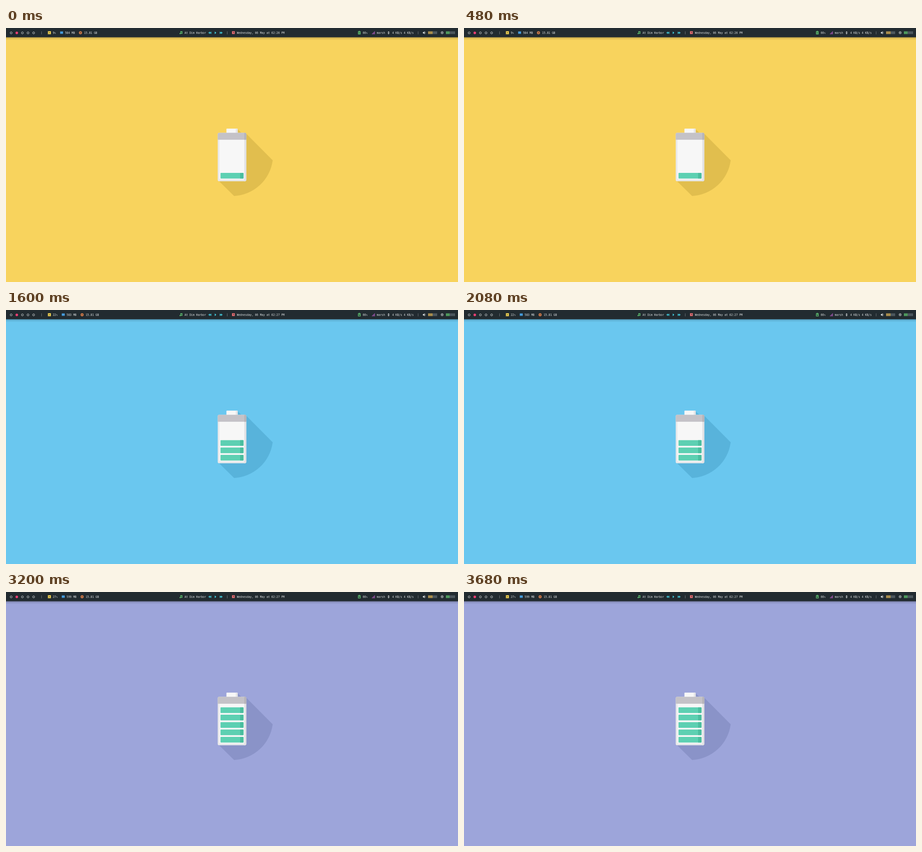
An HTML page with a canvas that plays this animation: 998 by 561 pixels, repeating every 4000 ms.

```html
<!DOCTYPE html>
<html lang="en">
<head>
<meta charset="utf-8">
<title>Battery desktop</title>
<style>
html, body { margin: 0; width: 100%; height: 100%; overflow: hidden; }
canvas { display: block; }
</style>
</head>
<body>
<canvas id="stage" width="998" height="561"></canvas>
<script>
const ctx = document.getElementById('stage').getContext('2d', { alpha: false });
const STEP = 800;
const TEXT_SCALE = 998 / 1920;
const CHAR = 7 * TEXT_SCALE;
const BAR = '#222b30', INK = '#dde1e2', CYAN = '#43cfe0';

const scenes = [
  { back: '#f8d35d', shade: '#e1be4e', cpu: 9, ram: 584, minute: 26 },
  { back: '#8aea93', shade: '#73cd7d', cpu: 6, ram: 584, minute: 26 },
  { back: '#6ac7ef', shade: '#58b3db', cpu: 22, ram: 583, minute: 27 },
  { back: '#ff8a88', shade: '#f97775', cpu: 1, ram: 583, minute: 27 },
  { back: '#9da5da', shade: '#8a93c8', cpu: 27, ram: 599, minute: 27 }
];

function rect(x, y, w, h, color) {
  ctx.fillStyle = color;
  ctx.fillRect(x, y, w, h);
}

function rounded(x, y, w, h, radius, color) {
  ctx.fillStyle = color;
  ctx.beginPath();
  ctx.roundRect(x, y, w, h, radius);
  ctx.fill();
}

function shape(color, ...points) {
  ctx.fillStyle = color;
  ctx.beginPath();
  points.forEach(([x, y]) => ctx.lineTo(x, y));
  ctx.fill();
}

function disc(x, y, r, color) {
  ctx.fillStyle = color;
  ctx.beginPath();
  ctx.arc(x, y, r, 0, 2 * Math.PI);
  ctx.fill();
}

function ring(x, y, r, color, width) {
  ctx.strokeStyle = color;
  ctx.lineWidth = width;
  ctx.beginPath();
  ctx.arc(x, y, r, 0, 2 * Math.PI);
  ctx.stroke();
}

function text(str, x, size = 11.63) {
  ctx.save();
  ctx.translate(x, 12.9);
  ctx.scale(TEXT_SCALE, TEXT_SCALE);
  ctx.font = `${size}px "DejaVu Sans Mono", monospace`;
  ctx.fillStyle = INK;
  ctx.fillText(str, 0, 0);
  ctx.restore();
}

function percent(value, x) {
  const digits = String(value);
  text(digits, x);
  text('%', x + digits.length * CHAR + 0.2, 9.5);
}

function separator(x) {
  rect(x, 7.5, 0.8, 6.5, '#7d8589');
}

function cpuIcon(x) {
  const color = '#f3d351';
  rect(x + 1, 8, 4.6, 4.8, color);
  for (const d of [0, 2.7, 5.4]) {
    rect(x + d, 7.1, 1.1, 6.6, color);
    rect(x, 7.1 + d, 6.5, 1.1, color);
  }
  rect(x + 2.5, 9.5, 1.6, 1.7, BAR);
}

function ramIcon(x) {
  const color = '#479edf';
  rect(x, 8.2, 6.4, 4, color);
  for (let i = 0; i < 4; i++) rect(x + 0.3 + i * 1.65, 7.2, 0.9, 6.1, color);
}

function diskIcon(x) {
  ring(x, 10.4, 2.45, '#ee874d', 1.6);
  disc(x, 10.4, 0.9, '#ee874d');
}

function musicIcon() {
  const color = '#6bdc7d';
  rect(385, 7.5, 0.9, 5, color);
  rect(388.4, 7.5, 0.9, 4.5, color);
  rect(385, 7.5, 4.3, 1.4, color);
  disc(384.6, 12.3, 1.2, color);
  disc(388, 11.8, 1.2, color);
}

function arrow(x, direction, width = 3.1) {
  shape(CYAN, [x, 7.7], [x + direction * width, 10.6], [x, 13.5]);
}

function clockIcon() {
  rect(499, 7.1, 6.2, 6.2, '#ec6f73');
  rect(501.6, 8, 0.8, 3, BAR);
  rect(501.6, 10.2, 2.4, 0.8, BAR);
}

function powerIcon(charging) {
  const color = '#6bdc7d';
  rect(778.8, 6.6, 2.6, 1.2, color);
  rect(777.3, 7.5, 5.6, 6.5, color);
  rect(778.4, 8.6, 3.4, 4.3, BAR);
  if (charging) {
    shape(color, [780.4, 8.8], [778.7, 11], [781.6, 11]);
  } else {
    rect(779, 9.2, 2.2, 1.2, color);
    rect(779, 11.2, 2.2, 1.2, color);
  }
}

function speakerIcon() {
  shape(INK, [920.4, 9.2], [922, 9.2], [924.2, 7.2], [924.2, 13.8], [922, 11.8], [920.4, 11.8]);
  rect(925.3, 8, 0.8, 0.9, INK);
  rect(925.3, 10.1, 1.5, 0.9, INK);
  rect(925.3, 12.2, 0.8, 0.9, INK);
}

function sunIcon(x, y) {
  ring(x, y, 1.6, INK, 1);
  for (let i = 0; i < 8; i++) {
    const a = i * Math.PI / 4;
    disc(x + 2.8 * Math.cos(a), y + 2.8 * Math.sin(a), 0.55, INK);
  }
}

function meter(x, filled, color) {
  for (let i = 0; i < 10; i++) rect(x + i * 2.02, 7.4, 1.3, 6, i < filled ? color : '#657077');
}

function panel(scene, charging) {
  const glow = ctx.createLinearGradient(0, 20, 0, 27);
  glow.addColorStop(0, 'rgba(0,0,0,.3)');
  glow.addColorStop(0.4, 'rgba(0,0,0,.1)');
  glow.addColorStop(1, 'rgba(0,0,0,0)');
  rect(0, 20, 998, 7, glow);
  rect(0, 0, 998, 20.4, BAR);

  for (let i = 0; i < 5; i++) {
    const x = 11.4 + i * 12.4;
    if (i === 1) disc(x, 10.8, 2.8, '#f53f74');
    else ring(x, 10.8, 2.2, INK, 0.9);
  }
  [78.2, 488.1, 909.6].forEach(separator);

  const shift = scene.cpu > 9 ? CHAR : 0;
  cpuIcon(92.6);
  percent(scene.cpu, 103.2);
  ramIcon(119.6 + shift);
  text(`${scene.ram} MB`, 130.2 + shift);
  diskIcon(164.4 + shift);
  text('15.81 GB', 172.3 + shift);

  musicIcon();
  text('At Dim Harbor', 394.3);
  arrow(450.1, -1);
  arrow(453.2, -1);
  arrow(460.9, 1, 3.4);
  arrow(472, 1);
  arrow(475, 1);
  clockIcon();
  text(`Wednesday, 06 May at 02:${scene.minute} PM`, 509.7);

  powerIcon(charging);
  percent(66, 787.7);
  for (let i = 0; i < 4; i++) {
    const h = 1.5 + i * 1.65;
    rect(808 + i * 1.75, 13.8 - h, 1.1, h, '#b65fc4');
  }
  text('marsh', 818.6);
  shape(INK, [842.7, 9.9], [844.8, 7.2], [846.9, 9.9]);
  shape(INK, [842.7, 11.2], [844.8, 13.9], [846.9, 11.2]);
  text('4 KB/s 4 KB/s', 852.8);
  speakerIcon();
  meter(932.2, 5, '#f2c35c');
  sunIcon(963, 10.4);
  meter(971.7, 4, '#67d675');
}

function battery(level, shade) {
  // Long shadow: two 45° edges cut by a circle around the battery.
  ctx.fillStyle = shade;
  ctx.beginPath();
  ctx.moveTo(511, 223);
  ctx.lineTo(520, 232);
  ctx.lineTo(529.5, 232.5);
  ctx.lineTo(589.1, 292.4);
  ctx.arc(498.8, 280.4, 90.8, Math.atan2(12, 90), Math.atan2(90.6, 4.8));
  ctx.lineTo(469, 337);
  ctx.fill();

  rounded(486.7, 222.3, 24.8, 12, 1.2, '#f7f7f7');
  rect(507.4, 222.8, 4, 9, '#e5e5e7');

  ctx.save();
  ctx.beginPath();
  ctx.roundRect(467.5, 231.4, 63, 107.2, 3);
  ctx.clip();
  rect(467, 231, 64, 108, '#e9e9eb');
  rect(526, 246, 5, 93, '#e2e2e4');
  rounded(471.3, 240, 54.9, 94.6, 2, '#f7f7f7');
  rect(467, 231, 64, 15.8, '#c4c2c7');
  rect(526.2, 231, 5, 15.8, '#b6b4b9');
  ctx.restore();

  for (let i = 0; i < level; i++) {
    const y = 320 - i * 16.3;
    rounded(473.6, y, 50.8, 12.5, 1, '#5dd0b2');
    rounded(517, y, 7.4, 12.5, [0, 1, 1, 0], '#4abd9e');
  }
}

function draw(now) {
  const index = Math.floor(now / STEP) % scenes.length;
  const scene = scenes[index];
  rect(0, 0, 998, 561, scene.back);
  battery(index + 1, scene.shade);
  panel(scene, index > 1);
}

const start = performance.now();
function tick() {
  draw(performance.now() - start);
  requestAnimationFrame(tick);
}
tick();
</script>
</body>
</html>
```
